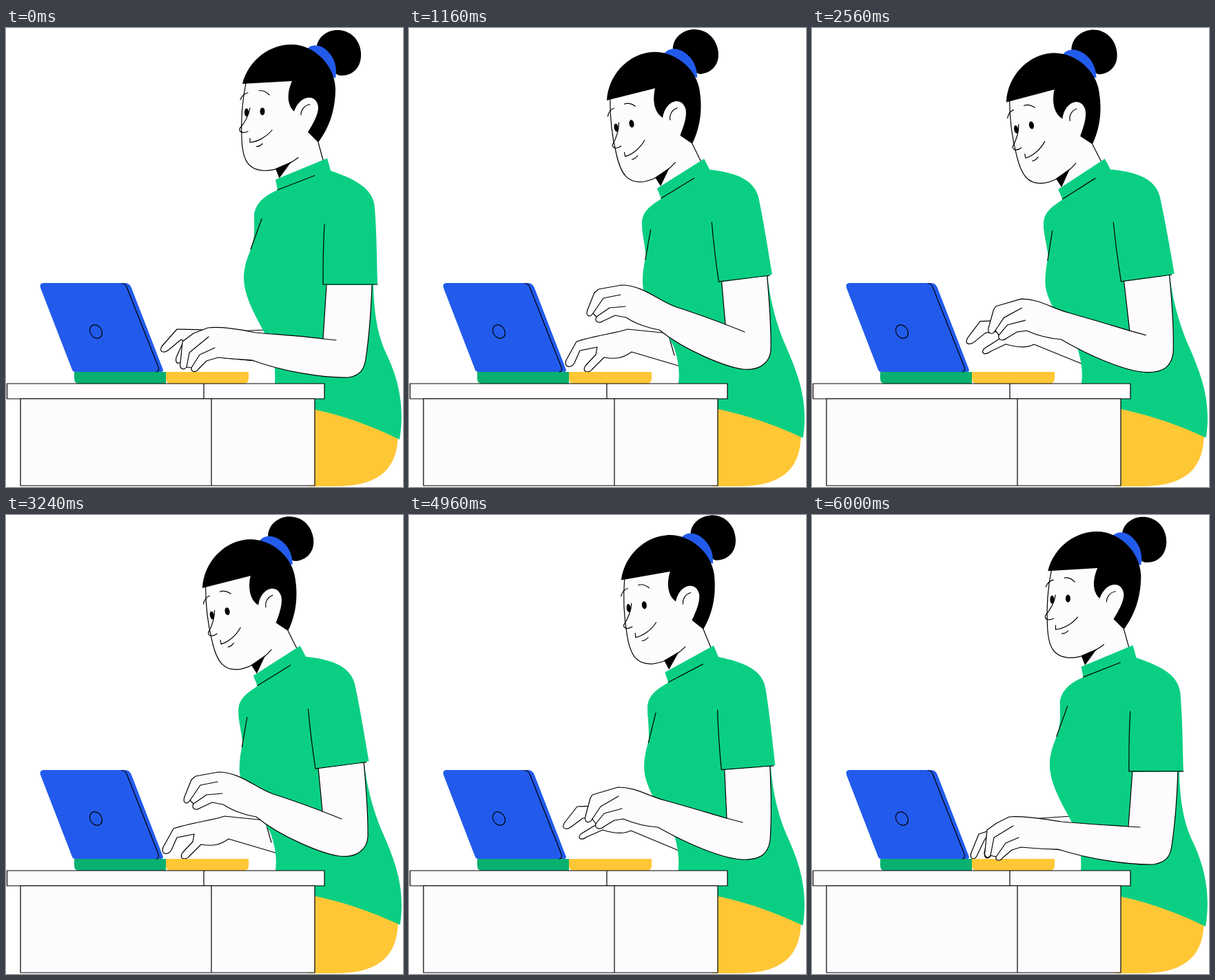
These frames come from a looping animation (576 by 666 pixels, 6040 ms). An HTML page:

```html
<!DOCTYPE html>
<html lang="en">
<head>
<meta charset="utf-8">
<title>Typing at a desk</title>
<style>
  html, body { margin: 0; width: 576px; height: 666px; overflow: hidden; background: #fff; }
  svg { display: block; }
  .line { fill: none; stroke: #000; stroke-width: 1.2; stroke-linejoin: round; stroke-linecap: round; }
  .skin { fill: #fefbfe; }
  .limb { fill: #fefbfe; stroke: #000; stroke-width: 1.2; stroke-linejoin: round; stroke-linecap: round; }
  .shirt { fill: #0acf83; }
  .blue { fill: #225bec; }
  .yellow { fill: #ffc736; }
</style>
</head>
<body>
<svg width="576" height="666" viewBox="0 0 576 666">
  <path class="yellow" d="M440 540L572 575L568.5 596C566 640 541 665 478 665H440Z"/>

  <g id="head">
    <path class="skin" d="M347 78C342 110 341 140 342 160C343 190 350 206 375 207L391 204L396 228L468 215L453 166L452 100L415 70Z"/>
    <path d="M391 204L396.5 218L414 194Z"/>
    <path class="line" d="M348 80C342 110 341 140 342 160C343 190 350 206 375 207C395 207 412 197 424 188M453 166L461 195"/>
    <path d="M451 25C455 9 470 2 484 3C504 5 516 22 515 41C514 59 502 69 487 69C480 69 478 66 474 60Z"/>
    <path class="blue" d="M437 30C446 22 458 25 467 34C477 44 481 58 478 73L455 62Z"/>
    <path d="M343 81C352 45 385 23 415 24C445 24 477 52 478 88C478 125 465 150 453 166L438 151C446 138 453 126 453 115C451 94 426 97 418 121C408 112 407 95 415 77Z"/>
    <path class="line" d="M441 111C433 112 428 119 428 126M340 104C342 99 346 95 351 94M367 91C372 90 378 93 382 97M354 116C352 128 344 140 339 146C338 152 345 153 351 150M354 160V166C365 165 378 158 386 148M363 172C366 172 369 171 372 168"/>
    <ellipse cx="349" cy="122.5" rx="3" ry="6"/>
    <ellipse cx="372" cy="121" rx="3.5" ry="5.6"/>
  </g>

  <path id="far" class="limb"/>
  <path id="torso" class="shirt"/>
  <path id="seams" class="line"/>

  <path fill="#0ab06f" d="M99 499H232V516H105Q99 516 99 508Z"/>
  <path class="yellow" d="M232 499H352V508Q352 516 345 516H239Q232 516 232 508Z"/>
  <path class="blue" d="M54 370H173Q179 370 182 377L228 496Q228 499 225 499H101Q97 499 96 496L50 377Q48 371 54 370Z"/>
  <path class="line" d="M168 370.5Q174 371 176 378L221 492Q223 498 218 499"/>
  <ellipse class="line" cx="130.5" cy="440.5" rx="8.3" ry="10.4" transform="rotate(-35 130.5 440.5)"/>

  <path id="near" class="limb"/>
  <path id="fingers" class="line"/>

  <g class="limb">
    <path d="M1.5 516H462V538H1.5ZM287 516V538"/>
    <path d="M21 538H448V664H21ZM298 538V664"/>
  </g>
</svg>
<script>
const LOOP = 6040, STEP = 40;

// Body upright and leaning fully forward
const upright = {
  torso: 'M391 220L466 189L471 207C505 219 534 232 535 262C538 300 538 340 539 372L533 373C534 420 541 450 552 473C566 502 580 545 571 597C530 577 490 562 440 552L390 516C391 500 390 485 385 465C378 440 345 400 345 362C345 345 351 332 355 321C362 303 360 290 360 270C363 252 378 242 394 235Z',
  seams: 'M394 235L448 214M371 277L355 321M462 285C460 320 460 350 460 372L539 372',
  armIn: 'M465 373', armOut: 'C528 440 530 400 531 373'
};
const forward = {
  torso: 'M350 237L416 190L425 205C455 206 489 212 498 240C508 280 516 320 523 353L516 355C522 400 536 437 546 460C563 500 580 540 572 594C530 575 490 561 440 551L391 516C394 500 391 480 384 462C372 440 338 400 337 372C337 352 339 345 340 332C334 305 330 297 331 285C331 270 343 262 357 252Z',
  seams: 'M357 251L403 219M344 298L339 341M432 281C436 310 441 340 446 367L518 355',
  armIn: 'M450 367', armOut: 'C525 430 520 390 516 356'
};

// Hand poses: near arm, its finger creases, far arm
const resting = {
  near: 'L460 451C430 447 395 445 362 442C340 437 310 433 293 435L272 443L256 455L253 486C251 495 258 497 262 492L269 493C268 500 276 500 279 495L291 483L308 478C325 480 345 481 357 482C400 498 460 508 497 507C515 504 520 494 522 480',
  fingers: 'M262 492L266 471L294 448M269 493L281 474L303 464M460 451L479 453',
  far: 'M376 438L332 440C315 440 285 437 248 437L226 462C221 471 230 472 236 467L254 452L258 454L256 458L247 478C245 488 251 488 255 483L275 470C290 472 300 476 318 479L394 486M377 439L377 439'
};
const hovering = {
  near: 'L461 440C430 431 400 422 371 414C345 407 330 395 303 395L266 406L263 411L256 437C254 447 262 448 266 441L271 448C269 456 278 457 283 452L298 443L311 441C330 449 345 452 361 453C400 475 455 500 487 500C512 500 521 490 524 472',
  fingers: 'M266 441L278 423L304 408M271 448L283 433L309 426M461 440L484 446',
  far: 'M376 440L330 425C300 420 280 422 244 423L226 446C219 457 230 457 236 452L252 440L270 438L272 449L249 463C243 471 252 472 258 467L281 457C300 463 312 463 322 458L394 488M377 442L377 442'
};
const raised = {
  near: 'L459 430C435 421 410 412 388 405C362 396 340 373 308 373L275 379L269 384L259 409C256 418 262 421 267 414L272 419C268 427 276 429 282 425L299 417L315 420C330 430 350 436 363 438C400 468 460 492 484 495C510 498 524 484 525 467',
  fingers: 'M267 414L282 392L307 387M272 419L291 406L314 404M459 430L487 441',
  far: 'M376 443L317 437C300 443 270 446 243 455L228 482C224 493 235 494 240 486L248 468L273 463L271 474L256 490C250 500 261 501 265 496L283 478C300 481 310 479 323 470L394 491M377 447L385 475'
};
const settled = {
  near: 'L459 452C430 450 395 448 362 445C340 442 310 436 286 438L268 447L254 457L251 488C249 497 255 499 259 494L267 496C266 503 274 502 277 497L290 486L303 482C325 484 345 485 357 485C400 499 460 508 495 507C515 504 520 494 522 480',
  fingers: 'M259 494L264 468L292 451M267 496L281 476L300 468M459 452L476 453',
  far: 'M376 437L331 440C315 442 285 448 242 463L231 490C228 500 236 501 239 495L250 472L256 462L254 475L250 490C250 500 256 499 260 494L275 480C290 480 300 482 318 482L394 489M377 439L377 439'
};

const leanKeys = [[0, 0], [1160, .757], [1960, 1], [2900, .75], [3240, .785], [3640, .83], [4040, .8], [4960, .48], [6000, .01], [6040, 0]];
const strikes = [-360, 360, 760, 1160, 1560, 1960, 2387, 2813, 3240, 3640, 4040, 4480, 5440, 6400];

const $ = id => document.getElementById(id);
const lerp = (a, b, k) => a + (b - a) * k;
const clamp = x => Math.min(1, Math.max(0, x));
const smooth = x => (x = clamp(x), x * x * (3 - 2 * x));

// Blend two path strings of the same structure
function blend(a, b, k) {
  const to = b.match(/[\d.]+/g);
  let i = 0;
  return a.replace(/[\d.]+/g, n => lerp(+n, +to[i++], k).toFixed(2));
}
const mix = (a, b, k) =>
  Object.fromEntries(Object.keys(a).map(key => [key, blend(a[key], b[key], k)]));

// Smooth curve through the keys, flat at peaks and ends
function slope(keys, i) {
  if (i === 0 || i === keys.length - 1) return 0;
  const rate = j => (keys[j + 1][1] - keys[j][1]) / (keys[j + 1][0] - keys[j][0]);
  const a = rate(i - 1), b = rate(i);
  return a * b <= 0 ? 0 : 2 * a * b / (a + b);
}
function curve(keys, t) {
  const i = keys.findIndex((key, n) => n === keys.length - 2 || t < keys[n + 1][0]);
  const [t0, v0] = keys[i], [t1, v1] = keys[i + 1];
  const d = t1 - t0, u = (t - t0) / d, w = 1 - u;
  return v0 * w * w * (1 + 2 * u) + v1 * u * u * (1 + 2 * w)
    + d * u * w * (slope(keys, i) * w - slope(keys, i + 1) * u);
}

// 1 while the near hand is up, 0 midway between
function lift(t) {
  const i = strikes.findIndex(s => s > t);
  const a = strikes[i - 1], b = strikes[i];
  return .5 + .5 * Math.cos(2 * Math.PI * (t - a) / (b - a));
}

function draw(t) {
  const s = curve(leanKeys, t);
  const body = mix(upright, forward, s);
  const low = mix(resting, hovering, clamp(s / .48));
  const hands = mix(mix(low, raised, lift(t)), settled, smooth((t - 5120) / 640));

  $('torso').setAttribute('d', body.torso);
  $('seams').setAttribute('d', body.seams);
  $('near').setAttribute('d', body.armIn + hands.near + body.armOut);
  $('fingers').setAttribute('d', hands.fingers);
  $('far').setAttribute('d', hands.far);

  const arc = s * (1 - s);
  const x = -57 * s + 6 * arc, y = 5 * s - 10 * arc;
  $('head').setAttribute('transform', `translate(${x} ${y}) rotate(${-14.2 * s} 453 166)`);
}

const start = performance.now();
function tick() {
  const t = (performance.now() - start) % LOOP;
  draw(Math.floor(t / STEP) * STEP);
  requestAnimationFrame(tick);
}
tick();
</script>
</body>
</html>
```
